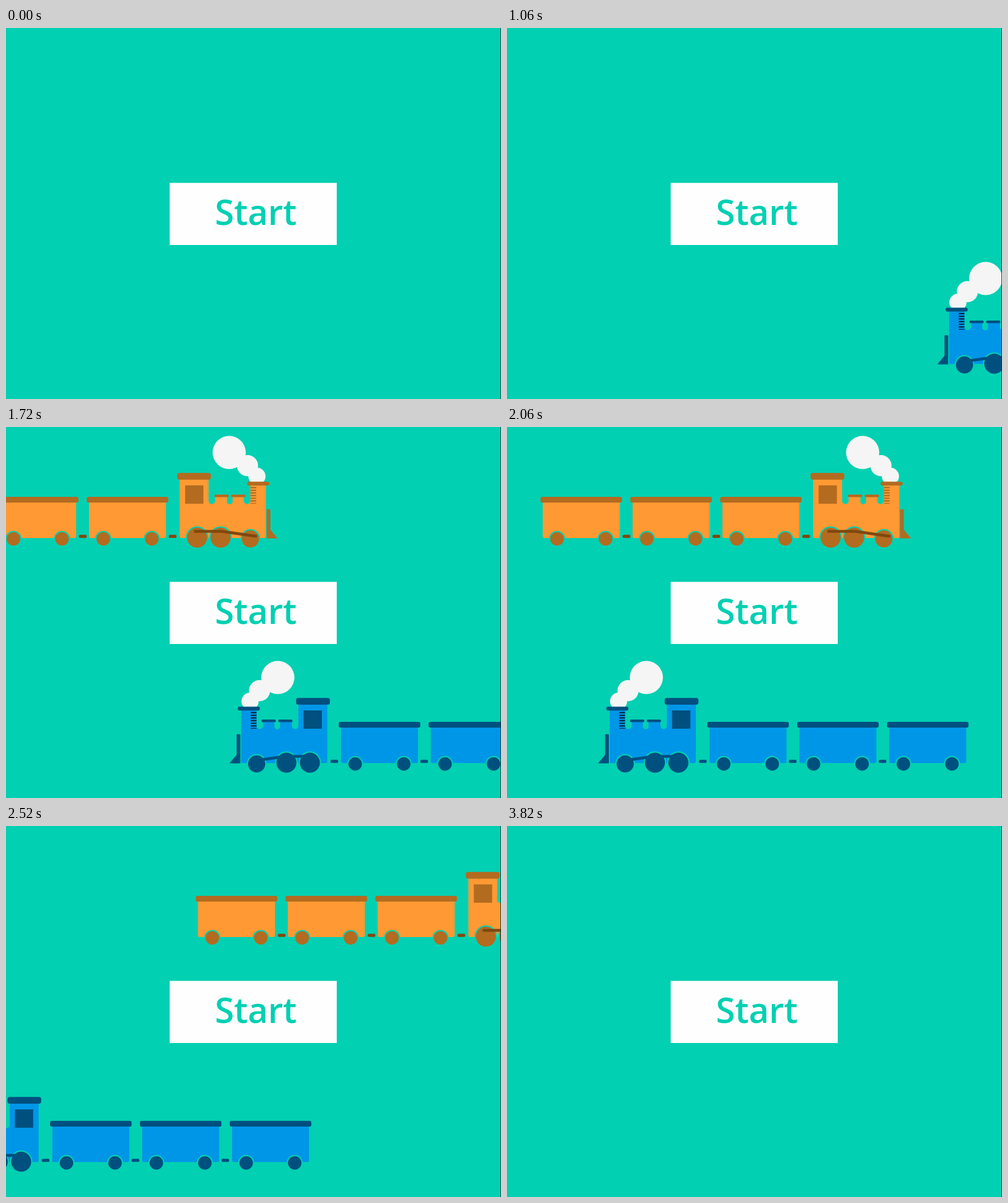
Animation, 865 px wide and 648 px high, one loop 4.34 s. Source, as an HTML page:

```html
<!DOCTYPE html>
<html lang="en">
<head>
<meta charset="utf-8">
<title>Start</title>
<style>
  html, body { margin: 0; width: 100%; height: 100%; overflow: hidden; background: #01d0b2; }
  svg { display: block; width: 865px; height: 648px; }
  .orange { --body: #ff9933; --dark: #b36b20; --rod: #80480f; --stripe: #b36b20; }
  .blue { --body: #0096e8; --dark: #00507f; --rod: #00507f; --stripe: #06263d; }
  .body { fill: var(--body); }
  .dark { fill: var(--dark); }
  .gap { fill: #01d0b2; }
  .link { fill: var(--rod); }
  .rod { fill: none; stroke: var(--rod); stroke-width: 5; stroke-linecap: round; stroke-linejoin: round; }
  .stripes { fill: none; stroke: var(--stripe); stroke-width: 10; stroke-dasharray: 2.2 2.45; }
  .label { font: 600 61px "Open Sans", "Noto Sans", sans-serif; fill: #01d0b2; text-anchor: middle; }
</style>
</head>
<body>
<svg viewBox="0 0 865 648">
  <defs>
    <g id="wheel">
      <circle class="gap" r="14"/>
      <circle class="dark" r="11.8"/>
    </g>
    <g id="bigWheel">
      <circle class="gap" r="19.7"/>
      <circle class="dark" r="17.5"/>
    </g>
    <g id="wagon">
      <rect class="body" x="145" y="128" width="134.5" height="66" rx="3"/>
      <rect class="dark" x="141" y="122" width="142.5" height="10" rx="3"/>
      <use href="#wheel" x="170" y="195.5"/>
      <use href="#wheel" x="254.8" y="195.5"/>
      <rect class="link" x="284.5" y="188.3" width="13.5" height="5.4" rx="2.5"/>
    </g>
    <g id="engine">
      <g fill="#f5f5f5">
        <circle cx="390" cy="44.5" r="29"/>
        <circle cx="422" cy="67.5" r="18.5"/>
        <circle cx="438.5" cy="86" r="15"/>
      </g>
      <path class="body" d="M303.5 90H354V129a5.75 5.75 0 0 0 11.5 0V121H386V130a5 5 0 0 0 10 0V121H415.5V129a5.75 5.75 0 0 0 11.5 0V100H454V191q0 3-3 3H306.5q-3 0-3-3Z"/>
      <rect class="dark" x="299" y="80.3" width="59" height="11.7" rx="4"/>
      <rect class="dark" x="313" y="102" width="32" height="32"/>
      <rect class="dark" x="364.3" y="118" width="25" height="4.6" rx="2.2"/>
      <rect class="dark" x="393.5" y="118" width="25" height="4.6" rx="2.2"/>
      <rect class="dark" x="421.5" y="95.5" width="38.5" height="6.8" rx="3"/>
      <path class="stripes" d="M432.2 104.8V134"/>
      <path class="dark" d="M455.5 145q0-1.5 1.5-1.5h3.5q1.5 0 1.5 1.5V179.500L474.500 194.500H455.500Z"/>
      <use href="#bigWheel" x="334" y="193.300"/>
      <use href="#bigWheel" x="375" y="193.300"/>
      <circle class="gap" cx="427" cy="195.500" r="17.200"/>
      <circle class="dark" cx="427" cy="195.500" r="15"/>
      <path class="rod" d="M330.500 182.300H377L436.500 190.700"/>
    </g>
    <g id="train">
      <use href="#wagon" x="-314"/>
      <use href="#wagon" x="-157"/>
      <use href="#wagon"/>
      <use href="#engine"/>
    </g>
  </defs>

  <rect width="865" height="648" fill="#01d0b2"/>
  <rect x="286" y="270.500" width="292" height="108.500" fill="#fefefe"/>
  <text class="label" x="436.500" y="344">Start</text>
  <g class="orange"><use class="mover" href="#train"/></g>
  <g class="blue" transform="translate(865 393) scale(-1 1)"><use class="mover" href="#train"/></g>
  <rect x="864" width="1" height="648" fill="#0a3b34"/>
</svg>
<script>
  const LOOP = 4340, STEP = 20, NOSE = 474.5;

  // [time in ms, distance of the nose from its own edge]
  const path = [
    [600, -1], [1060, 113], [1720, 474.5], [2060, 706],
    [2520, 979], [3040, 1307.500], [3300, 1511], [3320, 1527]
  ];
  const last = path.length - 1;
  const movers = document.querySelectorAll('.mover');

  function slope(i) {
    if (i === 0) return 0;
    const a = path[i - 1], b = path[Math.min(i + 1, last)];
    return (b[1] - a[1]) / (b[0] - a[0]);
  }

  // Smooth cubic through the points
  function noseAt(t) {
    if (t <= path[0][0]) return path[0][1];
    if (t >= path[last][0]) return path[last][1];
    const i = path.findIndex(p => p[0] > t) - 1;
    const [t0, x0] = path[i], [t1, x1] = path[i + 1];
    const d = t1 - t0, u = (t - t0) / d, v = 1 - u;
    return x0 * (1 + 2 * u) * v * v + x1 * u * u * (3 - 2 * u)
      + d * (slope(i) * u * v * v - slope(i + 1) * u * u * v);
  }

  const start = performance.now();

  function draw() {
    const t = (performance.now() - start) % LOOP;
    const x = noseAt(Math.floor(t / STEP) * STEP) - NOSE;
    movers.forEach(m => m.setAttribute('transform', `translate(${x.toFixed(2)} 0)`));
    requestAnimationFrame(draw);
  }
  draw();
</script>
</body>
</html>
```
